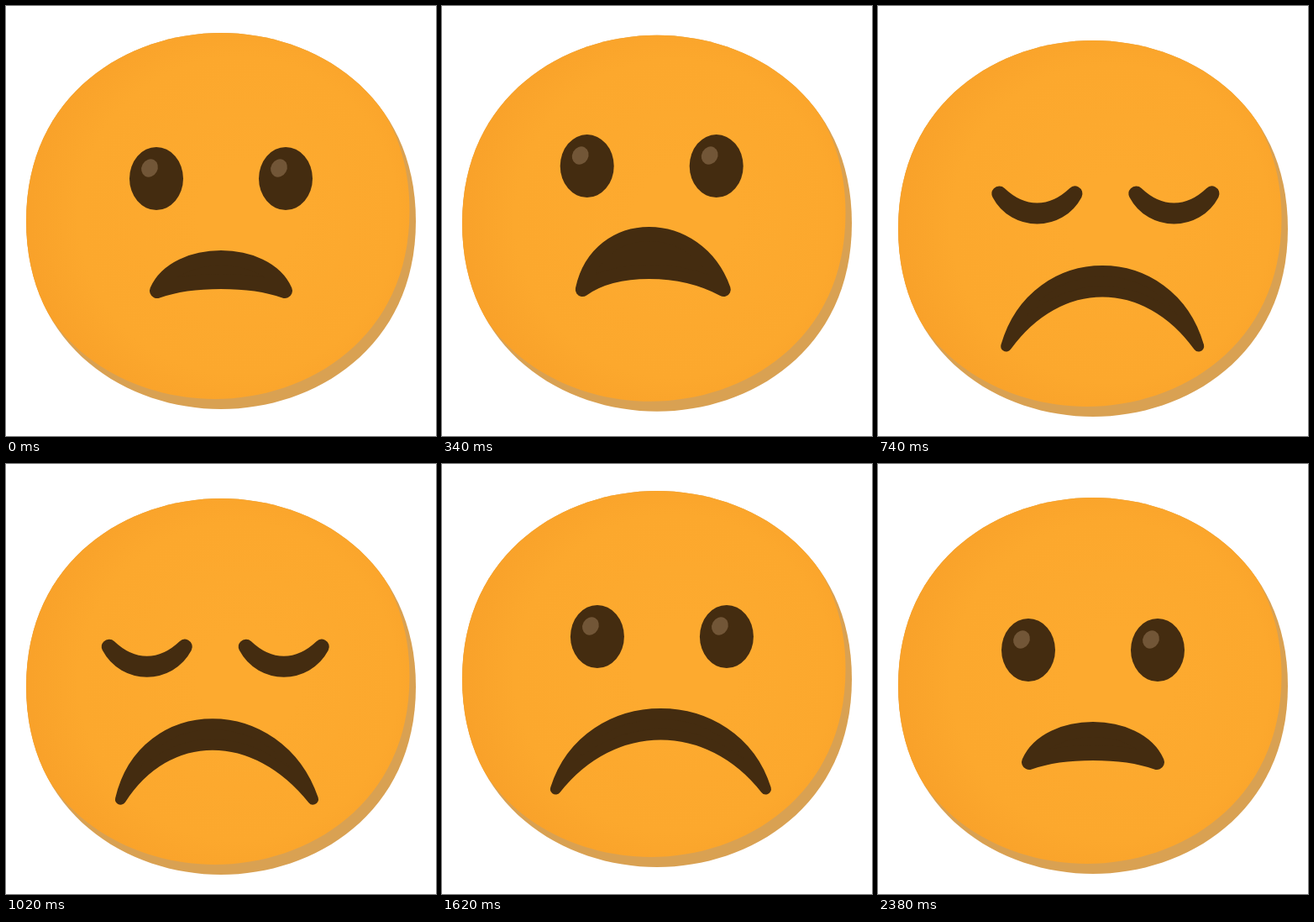
Recreate the animation shown at these times as an HTML page with a canvas. Size 512 by 512 pixels, loop 2.4 s.

```html
<!DOCTYPE html>
<html>
<head>
<meta charset="utf-8">
<style>
html, body { margin: 0; height: 100%; overflow: hidden; background: #fff; }
canvas { display: block; }
</style>
</head>
<body>
<canvas id="stage" width="512" height="512"></canvas>
<script>
const ctx = document.getElementById('stage').getContext('2d');
const LOOP = 2400, CYCLE = 2240;
const BROWN = '#442c10', SHINE = '#725637', SHADOW = '#d9a152';

// Smooth step from 0 to 1 between two times.
function ease(t, start, end) {
  const u = Math.min(1, Math.max(0, (t - start) / (end - start)));
  return u * u * (3 - 2 * u);
}

// Dip, hop, slump, then a slow recovery.
const faceY = t => 8 * ease(t, 0, 140) - 16 * ease(t, 140, 255)
  + 17 * ease(t, 255, 400) - 9 * ease(t, 1060, 1610);
const featureY = t => 16 * ease(t, 0, 140) - 32 * ease(t, 140, 320)
  + 35 * ease(t, 320, 520) - 19 * ease(t, 600, 1640);

// Head shake that fades in and out.
const sway = t => 15 * ease(t, 180, 520) * (1 - ease(t, 1250, 1900))
  * Math.cos(2 * Math.PI * (t - 730) / 900);
const openness = t => 1 - ease(t, 390, 490) + ease(t, 1110, 1220);

const REST = { half: 76, ends: 339, top: 300, inner: 328, radius: 9 };
const GASP = { half: 84, ends: 352.5, top: 286.5, inner: 331.5, radius: 8.5 };
const FROWN = { half: 114.5, ends: 387, top: 297.5, inner: 322, radius: 6.5 };

function mix(a, b, u) {
  const pose = {};
  for (const key in a) pose[key] = a[key] + (b[key] - a[key]) * u;
  return pose;
}

function mouthPose(t) {
  const frown = { ...FROWN, half: FROWN.half + 10.5 * ease(t, 1020, 1600) };
  const gasp = mix(REST, GASP, ease(t, 140, 340));
  return mix(mix(gasp, frown, ease(t, 340, 560)), REST, ease(t, 1620, 1940));
}

function ellipse(x, y, rx, ry, color, angle = 0) {
  ctx.beginPath();
  ctx.ellipse(x, y, rx, ry, angle, 0, 2 * Math.PI);
  ctx.fillStyle = color;
  ctx.fill();
}

// Slightly squarish oval made of four mirrored curves.
function headShape(x, y, color) {
  const rx = 232, ry = 224, kx = rx * 0.475, ky = ry * 0.68;
  ctx.beginPath();
  ctx.moveTo(x, y - ry);
  ctx.bezierCurveTo(x + kx, y - ry, x + rx, y - ky, x + rx, y);
  ctx.bezierCurveTo(x + rx, y + ky, x + kx, y + ry, x, y + ry);
  ctx.bezierCurveTo(x - kx, y + ry, x - rx, y + ky, x - rx, y);
  ctx.bezierCurveTo(x - rx, y - ky, x - kx, y - ry, x, y - ry);
  ctx.fillStyle = color;
  ctx.fill();
}

// Bent shape with round ends; top and inner are the heights of its two arcs at mid-span.
function crescent(x, { half, ends, top, inner, radius }, bulge, skew = 0) {
  const arc = (from, to, peak, bend) => {
    const y = (peak - ends / 4) / 0.75, c = half * bend;
    ctx.bezierCurveTo(x + from * c + skew, y, x + to * c + skew, y, x + to * half, ends);
  };
  ctx.beginPath();
  ctx.moveTo(x - half, ends);
  arc(-1, 1, top, bulge);
  arc(1, -1, inner, bulge * 0.65);
  ctx.closePath();
  ctx.fillStyle = ctx.strokeStyle = BROWN;
  ctx.lineWidth = 2 * radius;
  ctx.lineJoin = 'round';
  ctx.fill();
  ctx.stroke();
}

function drawFace(y) {
  const glow = ctx.createRadialGradient(290, 250, 60, 270, 250, 260);
  glow.addColorStop(0, '#fdaa2f');
  glow.addColorStop(0.65, '#fca82d');
  glow.addColorStop(1, '#f8a029');
  ctx.save();
  ctx.translate(0, y);
  headShape(256, 256, SHADOW);
  ctx.clip();
  headShape(248.5, 244, glow);
  ctx.restore();
}

function drawEye(side, x, y, open) {
  if (open > 0.3) {
    const cx = x + side * 77;
    ellipse(cx, y, 32, 37.5 * open, BROWN);
    ellipse(cx - 8, y - 12.5 * open, 9.5, 11 * open, SHINE, 0.5);
  } else {
    const drop = 1 - open;
    const lid = { half: 45, ends: y, top: y + 27 * drop, inner: y + 20 * drop, radius: 9 };
    crescent(x + side * 81.5, lid, 0.58);
  }
}

function draw(now) {
  const t = now % LOOP % CYCLE;
  const x = sway(t), y = featureY(t);
  ctx.clearRect(0, 0, 512, 512);
  drawFace(faceY(t));
  for (const side of [-1, 1]) drawEye(side, 256 + x, 205.5 + y, openness(t));
  ctx.save();
  ctx.translate(0, y);
  crescent(256 + 0.75 * x, mouthPose(t), 0.7, Math.min(0, x));
  ctx.restore();
  requestAnimationFrame(draw);
}
draw(performance.now());
</script>
</body>
</html>
```
